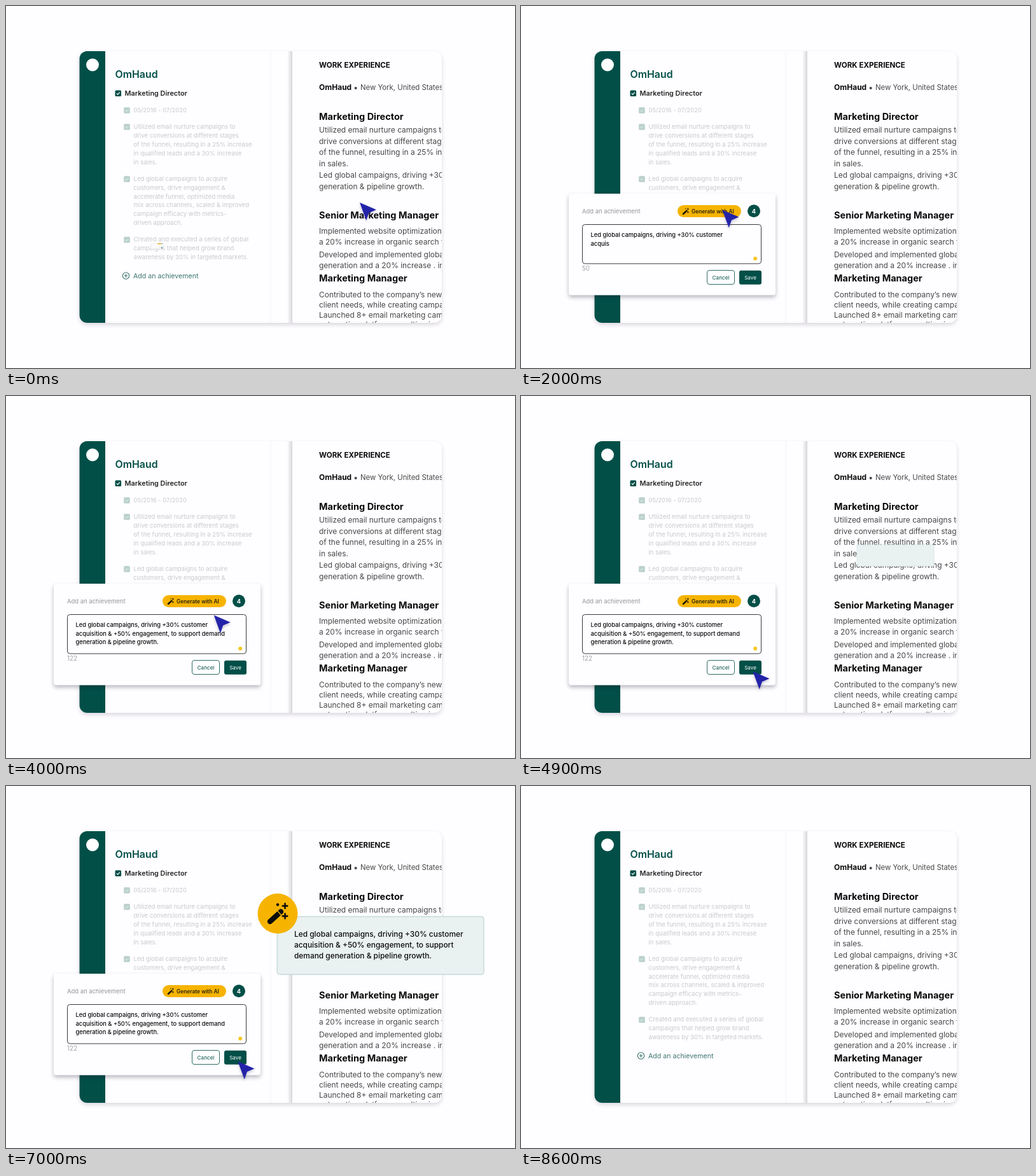
Write an HTML page with a canvas that moves like this. It is 800 px wide and 569 px high and loops after 10 s.

```html
<!DOCTYPE html>
<html lang="en">
<head>
<meta charset="utf-8">
<title>Resume builder</title>
<style>
  html, body { margin: 0; width: 100%; height: 100%; overflow: hidden; background: #fefdff; }
  canvas { display: block; width: 800px; height: 569px; }
</style>
</head>
<body>
<canvas id="stage"></canvas>
<script>
const W = 800, H = 569, LOOP = 10000;
const GREEN = '#024f48', YELLOW = '#f6b400', PAPER = '#fefdff', INK = '#0c0c0c';
const BODY = '#484848', FADED = '#c7caca', MINT = '#b9d0cc', BLUE = '#2323a9';
const FONT = 'Inter, "Open Sans", sans-serif';
const COMPANY = 'OmHaud';

const canvas = document.getElementById('stage');
const ctx = canvas.getContext('2d');
const dpr = window.devicePixelRatio || 1;
canvas.width = W * dpr;
canvas.height = H * dpr;

const clamp = x => Math.min(1, Math.max(0, x));
const progress = (t, start, length) => clamp((t - start) / length);
const inOut = x => x < 0.5 ? 4 * x ** 3 : 1 - (2 - 2 * x) ** 3 / 2;
const backIn = (x, k) => (k + 1) * x ** 3 - k * x * x;
const popIn = (t, start, length, k = 1.7) => 1 - backIn(1 - progress(t, start, length), k);
const popOut = (t, start, length, k = 1.7) => 1 - backIn(progress(t, start, length), k);

function text(str, x, y, size, color, weight = 400, align = 'left') {
  ctx.font = `${weight} ${size}px ${FONT}`;
  ctx.fillStyle = color;
  ctx.textAlign = align;
  ctx.fillText(str, x, y);
}

function lines(list, x, y, step, size, color, weight) {
  list.forEach((str, i) => text(str, x, y + i * step, size, color, weight));
}

function box(x, y, w, h, r, fill, stroke) {
  ctx.beginPath();
  ctx.roundRect(x, y, w, h, r);
  if (fill) { ctx.fillStyle = fill; ctx.fill(); }
  if (stroke) { ctx.strokeStyle = stroke; ctx.lineWidth = 1; ctx.stroke(); }
}

function disc(x, y, r, fill) {
  ctx.beginPath();
  ctx.arc(x, y, r, 0, Math.PI * 2);
  ctx.fillStyle = fill;
  ctx.fill();
}

function stroke(points, color, width, cap = 'butt') {
  ctx.beginPath();
  points.forEach(([x, y], i) => i ? ctx.lineTo(x, y) : ctx.moveTo(x, y));
  ctx.strokeStyle = color;
  ctx.lineWidth = width;
  ctx.lineCap = cap;
  ctx.stroke();
}

// Canvas shadows ignore the transform, so follow its scale here.
function shadow(color, blur, dy) {
  const s = ctx.getTransform().a;
  ctx.shadowColor = color;
  ctx.shadowBlur = blur * s;
  ctx.shadowOffsetY = dy * s;
}

// Draws around (x, y) at the given scale, in stage coordinates.
function scaled(x, y, s, draw) {
  if (s <= 0.002) return;
  ctx.save();
  ctx.translate(x, y);
  ctx.scale(s, s);
  ctx.translate(-x, -y);
  draw();
  ctx.restore();
}

function check(x, y, fill, tick) {
  box(x - 4.8, y - 4.8, 9.6, 9.6, 1.6, fill);
  stroke([[x - 2.4, y], [x - 0.7, y + 1.8], [x + 2.5, y - 1.7]], tick, 1.2);
}

function plus(x, y, r, color, width) {
  stroke([[x - r, y], [x + r, y]], color, width);
  stroke([[x, y - r], [x, y + r]], color, width);
}

function wand(x, y, s, back) {
  ctx.save();
  ctx.translate(x, y);
  ctx.scale(s, s);
  stroke([[-12, 12.5], [5, -3]], INK, 8.4, 'round');
  stroke([[-0.5, -4.5], [5.5, 2.5]], back, 1.2);
  plus(11.5, -12, 4.8, INK, 2.6);
  plus(11.5, 4, 4.8, INK, 2.6);
  disc(0, -14, 2.2, INK);
  ctx.restore();
}

function editor() {
  text(COMPANY, 171.5, 113, 15.9, GREEN, 600);
  check(176.3, 137.3, GREEN, '#fff');
  text('Marketing Director', 186.5, 141, 10.9, '#262626', 600);

  [164, 190, 272, 367.5].forEach(y => check(190, y, MINT, '#d6e4e1'));
  text('05/2016 - 07/2020', 200.5, 167, 9.4, FADED);
  lines(['Utilized email nurture campaigns to', 'drive conversions at different stages',
    'of the funnel, resulting in a 25% increase', 'in qualified leads and a 30% increase',
    'in sales.'], 200.5, 193, 13.9, 9.6, FADED);
  lines(['Led global campaigns to acquire', 'customers, drive engagement &',
    'accelerate funnel, optimized media', 'mix across channels, scaled & improved',
    'campaign efficacy with metrics-', 'driven approach.'], 200.5, 274.7, 13.9, 9.6, FADED);
  lines(['Created and executed a series of global', 'campaigns that helped grow brand',
    'awareness by 30% in targeted markets.'], 200.5, 370, 13.9, 9.6, FADED);

  ctx.beginPath();
  ctx.arc(188.5, 424, 5.2, 0, Math.PI * 2);
  ctx.strokeStyle = '#3c756f';
  ctx.lineWidth = 1.1;
  ctx.stroke();
  plus(188.5, 424, 2.7, '#3c756f', 1.1);
  text('Add an achievement', 200, 427.7, 10.6, '#3c756f');
}

function resume() {
  const x = 492;
  const p = (str, y) => text(str, x, y, 11.95, BODY);
  const h = (str, y) => text(str, x, y, 14.5, INK, 700);

  text('WORK EXPERIENCE', x, 96.7, 11.6, INK, 700);
  text(COMPANY, x, 132, 12, INK, 700);
  text('•', 546, 132.5, 13, BODY);
  text('New York, United States', 557, 132, 11.35, BODY);

  h('Marketing Director', 179.3);
  lines(['Utilized email nurture campaigns to', 'drive conversions at different stages',
    'of the funnel, resulting in a 25% increase', 'in sales.',
    'Led global campaigns, driving +30% customer', 'generation & pipeline growth.'],
    x, 199, 17.7, 11.95, BODY);

  h('Senior Marketing Manager', 333.5);
  p('Implemented website optimization, with', 358);
  p('a 20% increase in organic search traffic', 374.5);
  p('Developed and implemented global lead', 395);
  p('generation and a 20% increase . in sales', 412);

  h('Marketing Manager', 433.3);
  lines(['Contributed to the company’s new goals and', 'client needs, while creating campaigns',
    'Launched 8+ email marketing campaigns', 'automation platform, resulting in more'],
    x, 458.3, 15.7, 11.95, BODY);
}

function card() {
  ctx.save();
  shadow('rgba(40,30,60,.17)', 6, 3);
  box(115.5, 71, 569.5, 427, 12, PAPER);
  ctx.restore();

  ctx.save();
  box(115.5, 71, 569.5, 427, 12);
  ctx.clip();
  ctx.fillStyle = GREEN;
  ctx.fillRect(115, 71, 41, 427);
  ctx.fillStyle = '#f5f4f6';
  ctx.fillRect(415.5, 71, 1.2, 427);
  const edge = ctx.createLinearGradient(442, 0, 450, 0);
  edge.addColorStop(0, 'rgba(90,85,95,0)');
  edge.addColorStop(1, 'rgba(90,85,95,.24)');
  ctx.fillStyle = edge;
  ctx.fillRect(442, 71, 8, 427);
  disc(136, 92.5, 10, '#fff');
  editor();
  resume();
  ctx.restore();
}

const MESSAGE = ['Led global campaigns, driving +30% customer',
  'acquisition & +50% engagement, to support demand', 'generation & pipeline growth.'];
const LENGTH = MESSAGE.join(' ').length;

function dialog(t) {
  ctx.save();
  shadow('rgba(30,25,45,.3)', 6, 3.5);
  box(75, 295, 325, 159.5, 4, PAPER);
  ctx.restore();

  text('Add an achievement', 96, 325.7, 9.4, '#a2a2a4', 500);
  box(246, 313, 100, 19, 9.5, YELLOW);
  wand(258.8, 322.8, 0.31, YELLOW);
  text('Generate with AI', 268, 325.6, 8.35, '#2a2410', 600);
  disc(366, 322.3, 10, GREEN);
  text('4', 366, 325.7, 9.4, '#fff', 700, 'center');

  box(96.5, 343.5, 281, 61.5, 4, null, '#3a3a3a');
  const typed = Math.min(LENGTH, Math.max(0, (t - 934) * 0.0471));
  let left = Math.floor(typed);
  MESSAGE.forEach((row, i) => {
    if (left > 0) text(row.slice(0, left), 109.5, 363.2 + i * 13.4, 9.3, INK, 500);
    left -= row.length + 1;
  });
  disc(368.2, 397, 3, '#f5c721');
  text(String(Math.round(typed)), 96, 416, 9.8, '#a2a2a4');

  box(292.5, 415.5, 43, 22, 3.5, null, '#2f6d67');
  text('Cancel', 314, 429.8, 8.2, GREEN, 400, 'center');
  box(343, 415.7, 35, 22, 3, GREEN);
  text('Save', 360.5, 429.8, 8.1, '#fff', 400, 'center');
}

function callout(t) {
  const cx = 588.5, cy = 250.7;
  const out = popOut(t, 7690, 270);
  scaled(cx, cy, popIn(t, 4865, 400) * out, () => {
    box(426.2, 205.2, 324.8, 91, 4, '#e9f1f1', '#b0cecb');
  });
  scaled(cx, cy, popIn(t, 4960, 400) * out, () => {
    lines(['Led global campaigns, driving +30% customer',
      'acquisition & +50% engagement, to support',
      'demand generation & pipeline growth.'], 453, 237, 16.9, 11.9, INK, 500);
  });
  scaled(427, 200.5, popIn(t, 5010, 400) * popOut(t, 7704, 270), () => {
    disc(427, 200.5, 31.5, YELLOW);
    wand(427, 200.5, 1, YELLOW);
  });
}

function pointer(t) {
  const a = inOut(progress(t, 0, 900)), b = inOut(progress(t, 3700, 800));
  const x = 556 - 239.5 * a + 48 * b;
  const y = 309 + 11.5 * a + 112.5 * b;
  ctx.save();
  ctx.globalAlpha = 1 - progress(t, 8000, 250);
  shadow('rgba(30,30,90,.3)', 4, 2);
  ctx.translate(x, y);
  ctx.beginPath();
  ctx.moveTo(0, 0);
  ctx.lineTo(26, 11.3);
  ctx.lineTo(14.5, 16);
  ctx.lineTo(10.2, 28);
  ctx.closePath();
  ctx.fillStyle = BLUE;
  ctx.fill();
  ctx.restore();
}

function draw(t) {
  ctx.setTransform(dpr, 0, 0, dpr, 0, 0);
  ctx.fillStyle = PAPER;
  ctx.fillRect(0, 0, W, H);
  card();
  scaled(237.5, 377, popIn(t, -5, 420, 1.4) * popOut(t, 7950, 320, 1.4), () => dialog(t));
  callout(t);
  pointer(t);
}

const begin = performance.now();
function tick() {
  draw((performance.now() - begin) % LOOP);
  requestAnimationFrame(tick);
}
tick();
</script>
</body>
</html>
```
